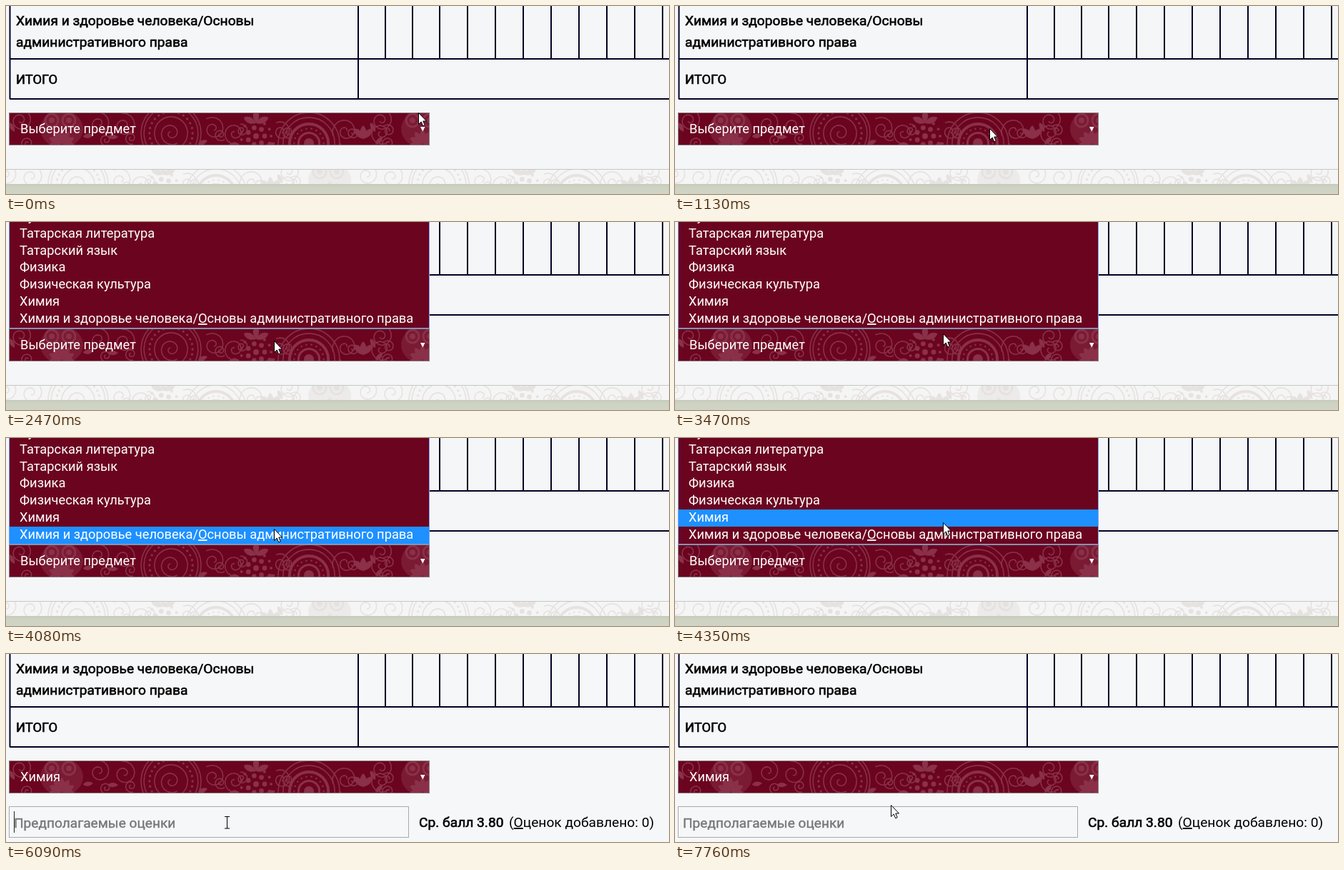
These frames come from a looping animation (928x263 px, 8000 ms). An HTML page:

```html
<!DOCTYPE html>
<html lang="ru">
<head>
<meta charset="utf-8">
<title>Выбор предмета</title>
<style>
html, body { margin: 0; width: 100%; height: 100%; overflow: hidden; background: #f5f6f8; }
svg { display: block; width: 928px; height: 263px; }
text { font: 18.3px Roboto, "Noto Sans", sans-serif; white-space: pre; }
.light { fill: #fff; }
.big { font-size: 19.2px; }
.strong { stroke: #000; stroke-width: .6px; }
.hint { font-size: 19.1px; fill: #777; stroke: #777; stroke-width: .4px; }
</style>
</head>
<body>
<svg viewBox="0 0 928 263">
  <defs>
    <clipPath id="selectClip"><rect x="5" y="150" width="587" height="44"/></clipPath>
    <clipPath id="stripClip"><rect y="229" width="928" height="20"/></clipPath>
    <linearGradient id="grass" x2="0" y2="1">
      <stop stop-color="#c5cabb"/><stop offset=".3" stop-color="#cdd2c2"/><stop offset="1" stop-color="#d0d4c4"/>
    </linearGradient>
    <g id="tile" fill="none" stroke="currentColor" stroke-width="1.6"></g>
  </defs>

  <rect id="page" width="928" height="263"/>
  <path id="grid" fill="none" stroke="#000022" stroke-width="2"/>
  <text class="big strong" x="14" y="27">Химия и здоровье человека/Основы</text>
  <text class="big strong" x="14" y="57">административного права</text>
  <text class="strong" x="14" y="109">ИТОГО</text>

  <g id="footer">
    <rect y="228" width="928" height="21" fill="#f5f5f5"/>
    <g clip-path="url(#stripClip)" color="#e6e2e0">
      <use href="#tile" x="-130" y="72"/><use href="#tile" x="375" y="72"/><use href="#tile" x="880" y="72"/>
    </g>
    <path d="M0 228.5H928" stroke="#c3c9c4"/>
    <rect y="249" width="928" height="14" fill="url(#grass)"/>
  </g>

  <g id="form">
    <rect x="4.5" y="213.5" width="559" height="43" fill="none" stroke="#a9a9a9"/>
    <text class="hint" x="11" y="243">Предполагаемые оценки</text>
    <path id="caret" d="M11.5 220V250" stroke="#222"/>
    <text class="big strong" x="578" y="242">Ср. балл 3.80</text>
    <text class="big" x="704" y="242">(<tspan text-decoration="underline">О</tspan>ценок добавлено: 0)</text>
  </g>

  <rect x="4.5" y="149.5" width="588" height="45" fill="#6b041f" stroke="#8d8185"/>
  <g clip-path="url(#selectClip)" color="#8a3049">
    <use href="#tile"/><use href="#tile" x="505"/>
  </g>
  <text id="value" class="light" x="20" y="178"></text>
  <path d="M580 169H586.5L583.25 175.5Z" fill="#fff"/>

  <g id="list">
    <rect x="4.5" y="-2" width="588" height="150.5" fill="#6b041f" stroke="#7ba0ee"/>
    <rect id="mark" x="5" width="587" height="24" fill="#1e90ff"/>
    <g id="items" class="light"></g>
  </g>

  <g id="pointer">
    <path id="arrow" d="M.5 .5V16.5L4.2 13L6.7 18.8L9.2 17.7L6.8 12H11.5Z" fill="#fff" stroke="#000"/>
    <path id="beam" d="M1 .5H8M4.5 .5V17M1 17H8" fill="none" stroke="#000"/>
  </g>
</svg>
<script>
const LOOP = 8000;
const $ = id => document.getElementById(id);
const show = (id, on) => $(id).setAttribute('display', on ? 'inline' : 'none');
const repeat = (n, draw) => Array.from({ length: n }, (_, i) => draw(i)).join('');

// Table rules: the first two columns are a pixel narrower
const colX = i => 607 + (i - 2) * (i < 2 ? 38 : 39);
$('grid').setAttribute('d', 'M5.5 0V130M493 0V130M5 74H928M5 130H928' +
  repeat(11, i => `M${colX(i)} 0V74`));

// Paisley ornament
let seed = 7;
const random = () => (seed = seed * 16807 % 2147483647) / 2147483647;
const at = (x, y, r, turn) => [x + r * Math.cos(turn), y + r * Math.sin(turn)].map(v => v.toFixed(1));
const ring = (x, y, r, width = 1.6) => `<circle cx="${x}" cy="${y}" r="${r}" stroke-width="${width}"/>`;
const dot = (x, y, r) => `<circle cx="${x}" cy="${y}" r="${r}" fill="currentColor" stroke="none"/>`;
const beads = (x, y, r, n, size) => repeat(n, i => dot(...at(x, y, r, i * 2 * Math.PI / n), size));
const leaf = (x, y, turn, size = .8) =>
  `<path transform="translate(${x} ${y}) rotate(${turn}) scale(${size})" fill="currentColor" stroke="none" d="M0 0C7 -9 7 -17 0 -24C-7 -17 -7 -9 0 0Z"/>`;
const fan = (x, y, n, spread) => repeat(n, i => leaf(x, y, spread * (i / (n - 1) - .5)));
const curl = (x, y, r, turn) =>
  `<path d="M${repeat(24, i => at(x, y, r * (1 - i / 26), turn + i * .42) + ' ')}"/>`;
const eye = (x, y) => ring(x, y, 9, 3) + dot(x, y, 4);
const bloom = (x, y) =>
  `<ellipse cx="${x}" cy="${y + 8}" rx="30" ry="26" fill="currentColor" stroke="none" opacity=".5"/>` +
  eye(x - 14, y - 4) + eye(x + 10, y - 4) + fan(x, y + 28, 7, 200);
const wheel = (x, y, r) => ring(x, y, r) + ring(x, y, r * .9) + beads(x, y, r * .72, 26, 1.7) +
  ring(x, y, r * .55) + curl(x, y, r * .4, 1);
const dome = (x, y, r) => ring(x, y, r) + ring(x, y, r * .84) + ring(x, y, r * .63, 4) +
  beads(x, y, r * .48, 18, 1.3) + ring(x, y, r * .34, 3) + dot(x, y, 7);
const berries = (x, y) => dot(x, y, 4) + beads(x, y, 12, 7, 3.4) + beads(x, y, 21, 13, 2) + fan(x, y - 18, 3, 130);

const spots = [20, 130, 165, 290, 320, 385, 475, 525];
$('tile').innerHTML = bloom(78, 164) + wheel(231, 178, 42) + berries(350, 182) + dome(424, 192, 43) + fan(500, 186, 3, 80) +
  spots.map(x => {
    const y = 160 + 22 * random(), turn = 6 * random();
    return curl(x, y, 14 + 5 * random(), turn) + curl(x + 10, 352 - y, 9, turn + 3) + leaf(x - 8, y + 16, 60 * turn, .6);
  }).join('');

// Drop-down items
const items = ['Русский язык', 'Татарская литература', 'Татарский язык', 'Физика', 'Физическая культура', 'Химия',
  'Химия и здоровье человека/<tspan text-decoration="underline">О</tspan>сновы административного права'];
$('items').innerHTML = items.map((s, i) =>
  `<text x="19" y="${Math.round(-2 + i * 23.8)}">${s}</text>`).join('');

// Pointer strokes, each walked in equal steps; sag bends the path downwards
const strokes = [
  { from: 390, till: 1130, steps: 7, x: 440, y: 171, sag: 24 },
  { from: 1250, till: 1850, steps: 6, x: 379, y: 163 },
  { from: 2100, till: 2100, steps: 1, x: 375, y: 166 },
  { from: 3230, till: 3960, steps: 7, x: 375, y: 131 },
  { from: 4080, till: 4350, steps: 3, x: 375, y: 118 },
  { from: 5410, till: 5690, steps: 3, x: 363, y: 160 },
  { from: 5850, till: 6090, steps: 3, x: 305, y: 227 },
  { from: 6480, till: 6600, steps: 2, x: 302, y: 211 }
];

function pointerAt(t) {
  let x = 577, y = 149;
  for (const s of strokes) {
    if (t < s.from) break;
    const gap = (s.till - s.from) / (s.steps - 1) || 1;
    const k = Math.min(s.steps, Math.floor((t - s.from) / gap + .001) + 1) / s.steps;
    x += (s.x - x) * k;
    y += (s.y - y) * k + (s.sag || 0) * Math.sin(Math.PI * k);
  }
  return [Math.round(x), Math.round(y)];
}

function render(t) {
  const [x, y] = pointerAt(t);
  const chosen = t >= 5040;
  const open = t >= 2470 && !chosen;
  const beam = chosen && y > 213;
  $('pointer').setAttribute('transform', `translate(${x} ${y})`);
  $('page').setAttribute('fill', chosen ? '#f6f7f9' : '#f5f6f8');
  show('arrow', !beam);
  show('beam', beam);
  show('list', open);
  show('mark', open && y < 149);
  $('mark').setAttribute('y', y < 124 ? 100 : 124);
  show('footer', !chosen);
  show('form', chosen);
  show('caret', t >= 6090 && (t - 6090) % 1160 < 510);
  $('value').textContent = chosen ? 'Химия' : 'Выберите предмет';
}

const start = performance.now();
function tick() {
  render((performance.now() - start) % LOOP);
  requestAnimationFrame(tick);
}
tick();
</script>
</body>
</html>
```
